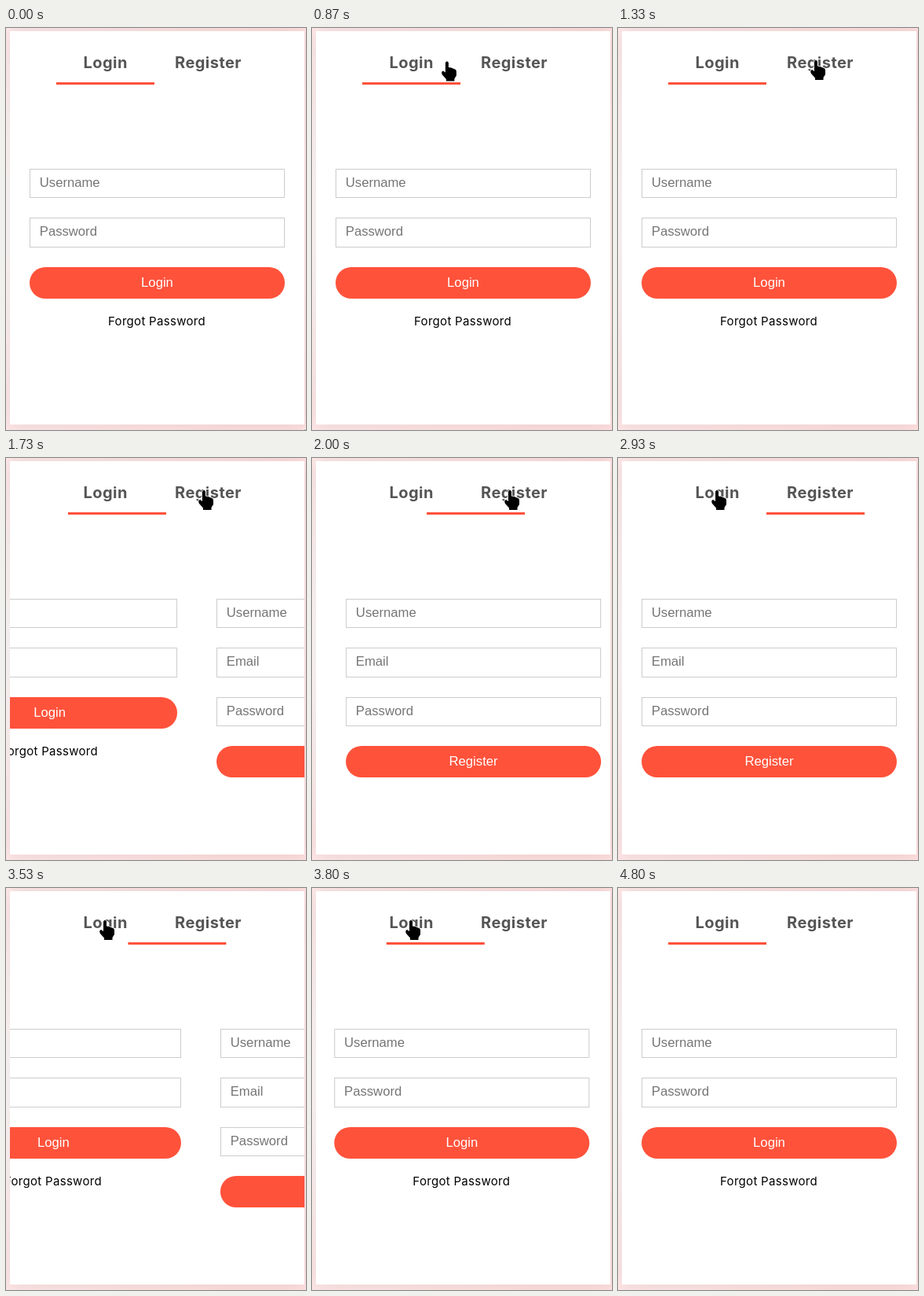
Write an HTML page that moves like this. It is 382 by 511 pixels and loops after 5.19 s.

```html
<!DOCTYPE html>
<html lang="en">
<head>
<meta charset="utf-8">
<title>Login form</title>
<style>
html, body { margin: 0; width: 100%; height: 100%; overflow: hidden; }
body { background: radial-gradient(650px 360px at -150px 240px, #fff, #ffdfdf); }
#card { position: absolute; left: 5px; top: 4px; width: 375px; height: 500px;
  background: #fff; box-shadow: 0 0 25px rgba(0, 0, 0, .1); }
svg { position: absolute; left: 0; top: 0; }
text { font: 16.667px "Liberation Sans", Arial, sans-serif; fill: #757575; }
.tab { font: 700 20px Inter, sans-serif; fill: #555; letter-spacing: .45px; text-anchor: middle; }
.link { font: 15px Inter, sans-serif; fill: #000; letter-spacing: .3px; text-anchor: middle; }
.send { fill: #fff; text-anchor: middle; }
.field { fill: #fff; stroke: #ccc; }
.red { fill: #ff523b; }
#cursor path { stroke: #fff; stroke-width: 1.6; paint-order: stroke; }
</style>
</head>
<body>
<div id="card"></div>
<svg width="382" height="511" viewBox="0 0 382 511">
  <clipPath id="clip"><rect x="5" y="4" width="375" height="500"/></clipPath>
  <text class="tab" x="126.7" y="51">Login</text>
  <text class="tab" x="257.5" y="51">Register</text>
  <rect id="line" class="red" y="69" width="125" height="3"/>
  <g clip-path="url(#clip)"><g id="forms"></g></g>
  <g id="cursor">
    <path id="arrow" d="M0 0V16.5L3.8 13L6.5 19L9 18L6.4 12H11.5Z"/>
    <path id="hand" d="M-2 1.5Q0-1.4 2 1.5V7.5L5.5 8L9 9.5Q12 10 12 13V18L9.5 22V25H-1V22.5L-6 17Q-8 13-5 12L-2 14Z"/>
    <path id="beam" d="M-3-9H3V-8H.5V8H3V9H-3V8H-.5V-8H-3Z"/>
  </g>
</svg>
<script>
const LOOP = 5190, STEP = 200 / 3, WIDTH = 375;
const TO_REGISTER = 1618, TO_LOGIN = 3345;
const $ = id => document.getElementById(id);

const field = (x, y, h, label) =>
  `<rect class="field" x="${x + .5}" y="${y + .5}" width="324" height="${h - 1}"/>` +
  `<text x="${x + 12.8}" y="${y + 23}">${label}</text>`;
const button = (x, y, label) =>
  `<rect class="red" x="${x}" y="${y}" width="325" height="40" rx="20"/>` +
  `<text class="send" x="${x + 162.5}" y="${y + 25}">${label}</text>`;

const left = 30, right = left + WIDTH;
$("forms").innerHTML =
  field(left, 179, 37, "Username") + field(left, 241, 38, "Password") +
  button(left, 304, "Login") + '<text class="link" x="192" y="378">Forgot Password</text>' +
  field(right, 179, 37, "Username") + field(right, 241, 38, "Email") +
  field(right, 304, 37, "Password") + button(right, 366, "Register");

const clamp = x => Math.min(1, Math.max(0, x));

// cubic-bezier(.25, .1, .25, 1)
function ease(x) {
  const curve = (a, b, u) => 3 * a * u * (1 - u) ** 2 + 3 * b * u * u * (1 - u) + u ** 3;
  let lo = 0, hi = 1;
  for (let i = 0; i < 24; i++) {
    const mid = (lo + hi) / 2;
    if (curve(.25, .25, mid) < clamp(x)) lo = mid; else hi = mid;
  }
  return curve(.1, 1, lo);
}

const slide = (t, ms) => ease((t - TO_REGISTER) / ms) - ease((t - TO_LOGIN) / ms);

// The pointer swings in along a curve, visits the tabs and drops out below
function pointer(t) {
  const k = clamp(t / 533), bend = 2 * k * (1 - k);
  let x = 380 * (1 - k) ** 2 - 170 * bend + 159 * k * k;
  let y = 510 * (1 - k) ** 2 + 200 * bend + 53 * k * k;
  const move = (from, to, toX, toY, pace = ease) => {
    const p = pace(clamp((t - from) / (to - from)));
    x += (toX - x) * p;
    y += (toY - y) * p;
  };
  move(800, 933, 175, 40);
  move(1067, 1333, 252, 41);
  move(2533, 2933, 126, 41);
  move(4400, 4800, 81, 670, p => p * p);
  return [x, y];
}

function shape(x, y) {
  const inside = (l, t, r, b) => x >= l && x <= r && y >= t && y <= b;
  if (inside(30, 179, 355, 216) || inside(30, 241, 355, 279)) return "beam";
  if (inside(64, 29, 314, 65) || inside(30, 304, 355, 344) ||
      inside(130, 362, 254, 384)) return "hand";
  return "arrow";
}

function draw(now) {
  const t = Math.floor((now % LOOP + 5) / STEP) * STEP;
  $("line").setAttribute("x", 64 + 125 * slide(t, 1000));
  $("forms").setAttribute("transform", `translate(${-WIDTH * slide(t, 500)})`);
  const [x, y] = pointer(t), kind = shape(x, y);
  $("cursor").setAttribute("transform", `translate(${x} ${y})`);
  for (const id of ["arrow", "hand", "beam"]) $(id).style.display = id === kind ? "" : "none";
}

const start = performance.now();
function tick() {
  draw(performance.now() - start);
  requestAnimationFrame(tick);
}
tick();
</script>
</body>
</html>
```
